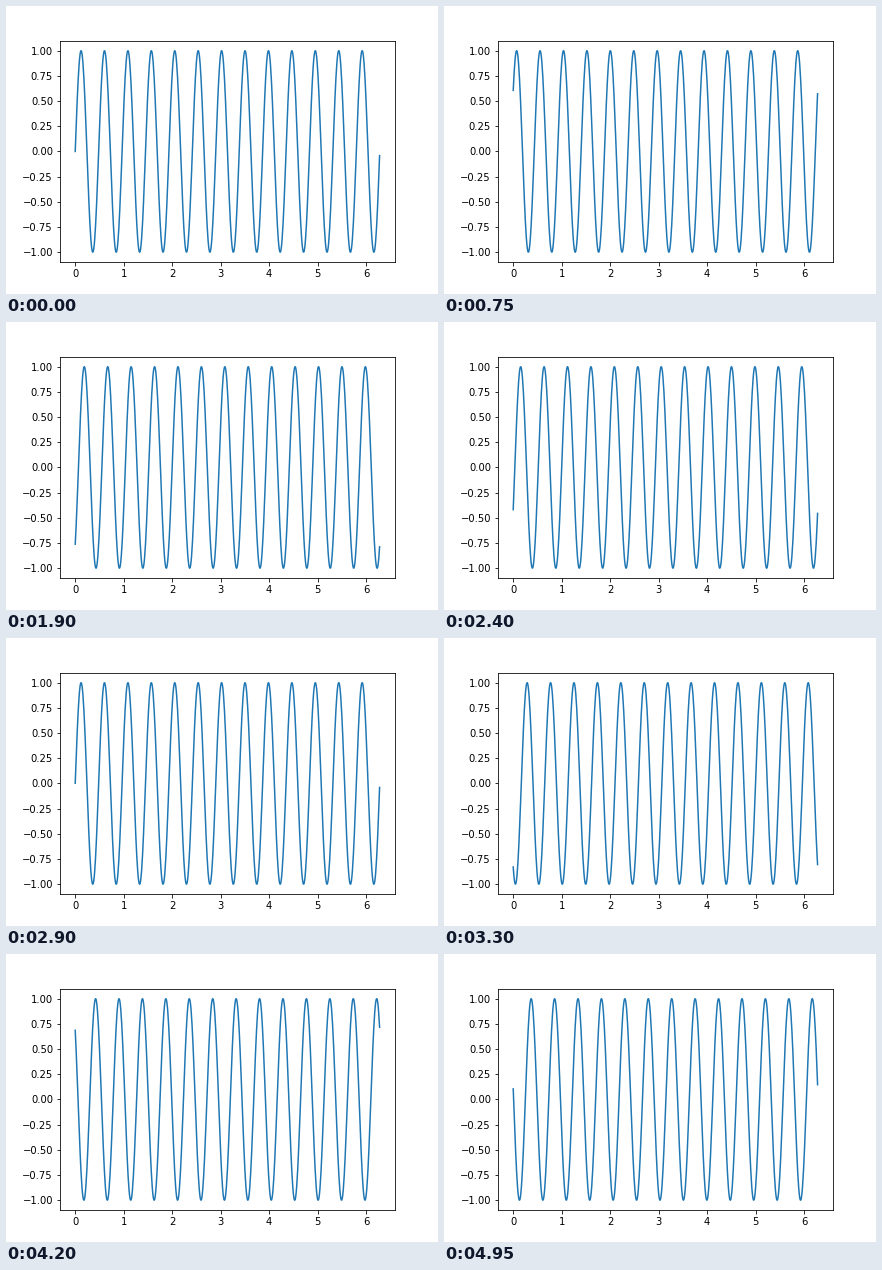
Animation of 432x288 px, one loop 5000 ms. Source, as a matplotlib script:

```python
import numpy as np
import matplotlib.pyplot as plt
from matplotlib.animation import FuncAnimation

FRAMES = 100
INTERVAL = 50  # ms
CYCLES = 13
SHIFT = 0.1    # leftward travel per frame, in x units

fig, ax = plt.subplots(figsize=(6, 4), dpi=72)
x = np.arange(0, 2 * np.pi, 0.01)


def wave(i):
    return np.sin(CYCLES * (x + SHIFT * i))


line, = ax.plot(x, wave(0))


def update(i):
    line.set_ydata(wave(i))
    return line,


def init():
    return update(0)


anim = FuncAnimation(fig, update, frames=FRAMES, init_func=init,
                     interval=INTERVAL, repeat=True, repeat_delay=0)
plt.show()
```
